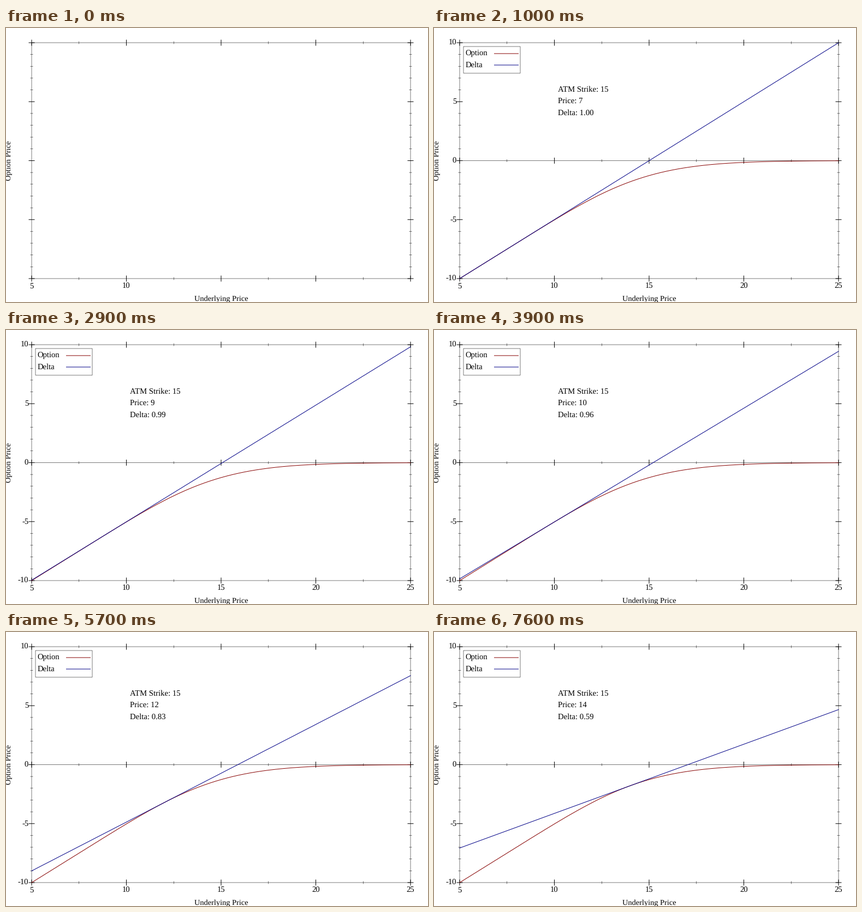
A matplotlib script that plays this animation: 773x503 px, repeating every 8000 ms.

```python
import math

import numpy as np
import matplotlib.pyplot as plt
from matplotlib.animation import FuncAnimation

W, H, DPI = 773, 503, 100
PX = 72 / DPI
STRIKE, VOLATILITY, YEARS = 15, 0.3, 0.5
SPREAD = VOLATILITY * math.sqrt(YEARS)
LEFT, RIGHT, TOP, BOTTOM = 47, 741, 27, 460
RED, BLUE = "#860000", "#000086"
THIN = 0.52

plt.rcParams["font.family"] = "Liberation Serif"
plt.rcParams["text.hinting"] = "none"

fig = plt.figure(figsize=(W / DPI, H / DPI), dpi=DPI, facecolor="white")
ax = fig.add_axes([0, 0, 1, 1])
ax.set_xlim(0, W)
ax.set_ylim(H, 0)
ax.axis("off")

# Drawing order of the parts; a redraw caught midway shows only the early ones.
AXES, FIRST_LABEL, ZERO_AXIS, OPTION, FULL = 1, 2, 11, 12, 13
parts = []


def px(x):
    return LEFT + (x - 5) * (RIGHT - LEFT) / 20


def py(y):
    return BOTTOM - (y + 10) * (BOTTOM - TOP) / 20


def line(xs, ys, order, color="black", width=1.0, z=2, cap="butt"):
    artist, = ax.plot(xs, ys, color=color, lw=width * PX, snap=False,
                      solid_capstyle=cap, zorder=z)
    parts.append((order, artist))
    return artist


def text(x, y, s, order, size=14.6, **kw):
    artist = ax.text(x, y, s, fontsize=size * PX, color="black",
                     va="baseline", **kw)
    parts.append((order, artist))
    return artist


def box(x0, y0, x1, y1, order):
    line([x0, x1, x1, x0, x0], [y0, y0, y1, y1, y0], order, width=THIN)


def x_ticks(y, order):
    """Ticks every 2.5 across a horizontal axis; every second one is major."""
    for i in range(9):
        reach, width = (2.5, THIN) if i % 2 else (5.5, 1)
        x = px(5 + 2.5 * i)
        line([x, x], [y - reach, y + reach], order, width=width)


def y_ticks(x, order):
    """Ticks every 1 along a vertical axis; every fifth one is major."""
    for value in range(-10, 11):
        reach, width = (2.5, THIN) if value % 5 else (5.5, 1)
        y = py(value)
        line([x - reach, x + reach], [y, y], order, width=width)


def normal_cdf(z):
    return 0.5 * (1 + math.erf(z / math.sqrt(2)))


def short_put(s):
    """Value and delta of a short put at underlying price s."""
    d1 = math.log(s / STRIKE) / SPREAD + SPREAD / 2
    delta = normal_cdf(-d1)
    return s * delta - STRIKE * normal_cdf(SPREAD - d1), delta


# Frame, ticks and titles
box(LEFT, TOP, RIGHT, BOTTOM, AXES)
for edge in (TOP, BOTTOM):
    x_ticks(edge, AXES)
for edge in (LEFT, RIGHT):
    y_ticks(edge, AXES)
text(394, 501, "Underlying Price", AXES, 14.4, ha="center")
text(9, 243.5, "Option Price", AXES, 14.4, ha="center",
     rotation=90, rotation_mode="anchor")

# Tick labels
for i in range(5):
    x, y = 5 + 5 * i, -10 + 5 * i
    text(px(x), 478, str(x), FIRST_LABEL + i, ha="center")
    text(41.2, py(y) + 4, str(y), FIRST_LABEL + 5 + i, ha="right")

# Axis through zero
line([LEFT, RIGHT], [py(0), py(0)], ZERO_AXIS, width=THIN)
x_ticks(py(0), ZERO_AXIS)

# Curves
prices = np.linspace(5, 25, 201)
values = np.array([short_put(s)[0] for s in prices])
line(px(prices), py(values), OPTION, RED, z=4, cap="projecting")
tangent = line([], [], FULL, BLUE, z=5, cap="projecting")

# Legend
box(54, 34, 158, 83, FULL)
for name, color, y in (("Option", RED, 47), ("Delta", BLUE, 68)):
    text(57.8, y + 3.5, name, FULL)
    line([110, 155], [y, y], FULL, color)

# Readout
text(226.7, 117, f"ATM Strike: {STRIKE}", FULL, 14.8)
price_text = text(226.7, 138.5, "", FULL, 14.8)
delta_text = text(226.7, 160, "", FULL, 14.8)

# Start of each redraw, and how far it has come in that step
STARTS = [0, 9, 18, 28, 38, 47, 56, 65, 75]
PROGRESS = {0: 3, 1: OPTION, 2: OPTION, 9: 9, 18: 0, 28: OPTION, 38: OPTION,
            47: OPTION, 56: ZERO_AXIS, 65: 9, 75: OPTION}


def update(frame):
    price = 5 + sum(start <= frame for start in STARTS)
    value, delta = short_put(price)
    ends = np.array([5, 25])
    tangent.set_data(px(ends), py(value + delta * (ends - price)))
    price_text.set_text(f"Price: {price}")
    delta_text.set_text(f"Delta: {delta:.2f}")
    progress = PROGRESS.get(frame, FULL)
    for order, artist in parts:
        artist.set_visible(order <= progress)
    return [artist for _, artist in parts]


anim = FuncAnimation(fig, update, frames=80, interval=100, repeat=True,
                     repeat_delay=0, blit=False)
plt.show()
```
